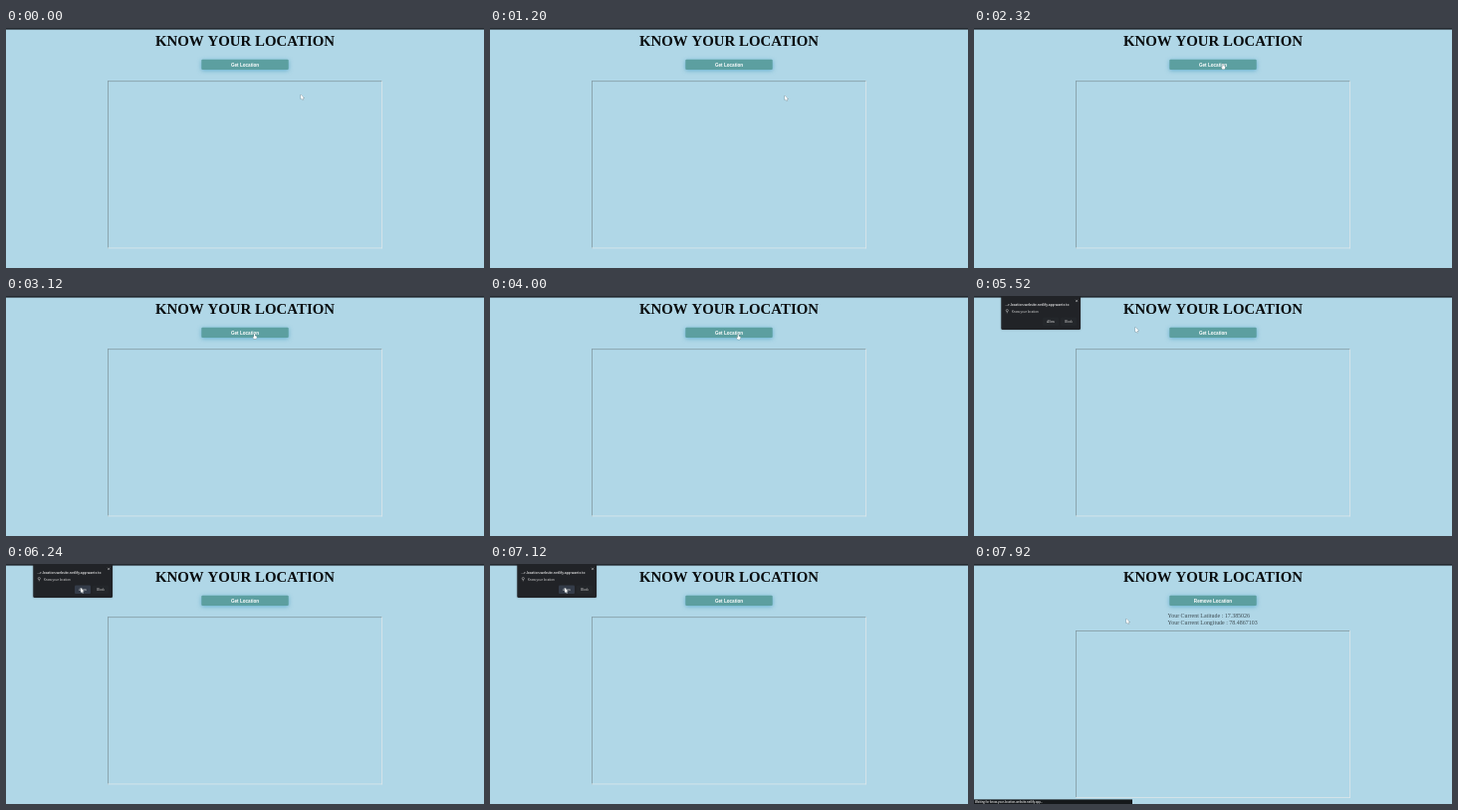
Write an HTML page with a canvas that moves like this. It is 480 by 242 pixels and loops after 8 s.

```html
<!DOCTYPE html>
<html lang="en">
<head>
<meta charset="utf-8">
<title>Know your location</title>
<style>
  html, body { margin: 0; width: 100%; height: 100%; overflow: hidden; background: #b0d7e7; }
  canvas { display: block; }
</style>
</head>
<body>
<canvas id="stage" width="480" height="242"></canvas>
<script>
const ctx = document.getElementById('stage').getContext('2d');
const LOOP = 8000, STEP = 80;
const SERIF = '"Liberation Serif", serif';
const SANS = '"Liberation Sans", sans-serif';
const UI = '"Open Sans", sans-serif';

// Cursor stops: time, x, y
const path = [
  [0, 296, 67], [900, 296, 68], [1600, 296, 68], [2240, 250, 36],
  [2800, 249.5, 38], [5040, 249, 39], [6000, 75, 24],
  [7200, 75, 24], [7760, 153, 55], [LOOP, 153, 55]
];

function rect(x, y, w, h, color) {
  ctx.fillStyle = color;
  ctx.fillRect(x, y, w, h);
}

function rounded(x, y, w, h, r, color) {
  ctx.fillStyle = color;
  ctx.beginPath();
  ctx.roundRect(x, y, w, h, r);
  ctx.fill();
}

// Set large and scaled down, so that small type keeps its proportions
function text(str, x, y, size, family, color, weight = 400, align = 'left') {
  ctx.save();
  ctx.translate(x, y);
  ctx.scale(0.1, 0.1);
  ctx.font = `${weight} ${size * 10}px ${family}`;
  ctx.textAlign = align;
  ctx.fillStyle = color;
  ctx.fillText(str, 0, 0);
  ctx.restore();
}

function button(label) {
  ctx.save();
  ctx.shadowColor = 'rgba(50, 150, 190, .6)';
  ctx.shadowBlur = 4;
  ctx.shadowOffsetY = 1;
  rounded(196.3, 31.7, 87.4, 10.2, 1, '#5c9fa0');
  ctx.restore();
  text(label, 240, 38.5, 4.6, SANS, '#fff', 700, 'center');
}

function mapFrame(y) {
  rect(102, y, 276, 0.8, '#8299a2');
  rect(102, y, 0.8, 169, '#8299a2');
  rect(102, y + 168.2, 276, 0.8, '#dce7ea');
  rect(377.2, y, 0.8, 169, '#dce7ea');
}

function popup(hover) {
  ctx.save();
  ctx.shadowColor = 'rgba(0, 0, 0, .35)';
  ctx.shadowBlur = 2;
  rounded(27.3, 0, 79.7, 34, [0, 0, 1.5, 1.5], '#212327');
  ctx.restore();
  text('...r-location-website.netlify.app wants to', 31.5, 9.6, 3.3, UI, '#f0f0f0', 600);
  text('Know your location', 38, 16.6, 3, UI, '#dedede');
  ctx.strokeStyle = '#ccc';
  ctx.lineWidth = 0.5;
  ctx.beginPath();
  ctx.arc(33.3, 14.6, 1.1, 0, 7);
  ctx.moveTo(33.3, 15.7);
  ctx.lineTo(33.3, 17.3);
  ctx.moveTo(102, 3.8);
  ctx.lineTo(104.2, 6);
  ctx.moveTo(104.2, 3.8);
  ctx.lineTo(102, 6);
  ctx.stroke();
  rounded(69, 21.5, 16, 8.5, 1, hover ? '#343c49' : '#24272b');
  rounded(87, 21.5, 16, 8.5, 1, '#24272b');
  text('Allow', 77, 26.9, 3, UI, '#ddd', 400, 'center');
  text('Block', 95, 26.9, 3, UI, '#ddd', 400, 'center');
}

function cursorAt(t) {
  const i = path.findIndex(p => p[0] > t);
  const [t0, x0, y0] = path[i - 1], [t1, x1, y1] = path[i];
  const k = (t - t0) / (t1 - t0), e = k * k * (3 - 2 * k);
  return [x0 + (x1 - x0) * e, y0 + (y1 - y0) * e];
}

function cursor(x, y) {
  const overButton = x > 196 && x < 284 && y > 31 && y < 42;
  ctx.save();
  ctx.translate(x, y);
  ctx.fillStyle = '#fff';
  ctx.strokeStyle = '#5d6a70';
  ctx.lineWidth = 0.5;
  ctx.lineJoin = 'round';
  ctx.fill(ctx.stroke(new Path2D(overButton
    ? 'M-.5 0 H.5 V2 L2.3 2.6 V4.2 L1.6 5.3 H-.6 L-1.8 3.2 L-.5 3.4 Z'
    : 'M0 0 V4.8 L1.1 3.9 L1.9 5.6 L2.7 5.2 L1.9 3.6 L3.4 3.5 Z')) ||
    new Path2D(overButton
    ? 'M-.5 0 H.5 V2 L2.3 2.6 V4.2 L1.6 5.3 H-.6 L-1.8 3.2 L-.5 3.4 Z'
    : 'M0 0 V4.8 L1.1 3.9 L1.9 5.6 L2.7 5.2 L1.9 3.6 L3.4 3.5 Z'));
  ctx.restore();
}

function draw(now) {
  const t = Math.floor(now % LOOP / STEP) * STEP;
  const located = t >= 7440;
  const [x, y] = cursorAt(t);

  rect(0, 0, 480, 242, '#b0d7e7');
  rect(0, 0, 480, 1.6, '#24292f');
  text('KNOW YOUR LOCATION', 240, 18.2, 14.9, SERIF, '#080b0d', 700, 'center');
  button(located ? 'Remove Location' : 'Get Location');
  mapFrame(located ? 67 : 53.3);
  if (located) {
    text('Your Current Latitude : 17.385026', 194.5, 54.2, 5.95, SERIF, '#3c4a50');
    text('Your Current Longitude : 78.4867103', 194.5, 61.2, 5.95, SERIF, '#3c4a50');
  }
  if (t >= 4240 && t < 7280) popup(x < 85);
  if (t >= 7600) {
    rect(0, 237.4, 159, 4.6, '#15181b');
    text('Waiting for know-your-location-website.netlify.app...', 1, 240.8, 2.7, UI, '#eee', 600);
  }
  cursor(x, y);
}

function tick() {
  draw(performance.now());
  requestAnimationFrame(tick);
}
tick();
</script>
</body>
</html>
```
